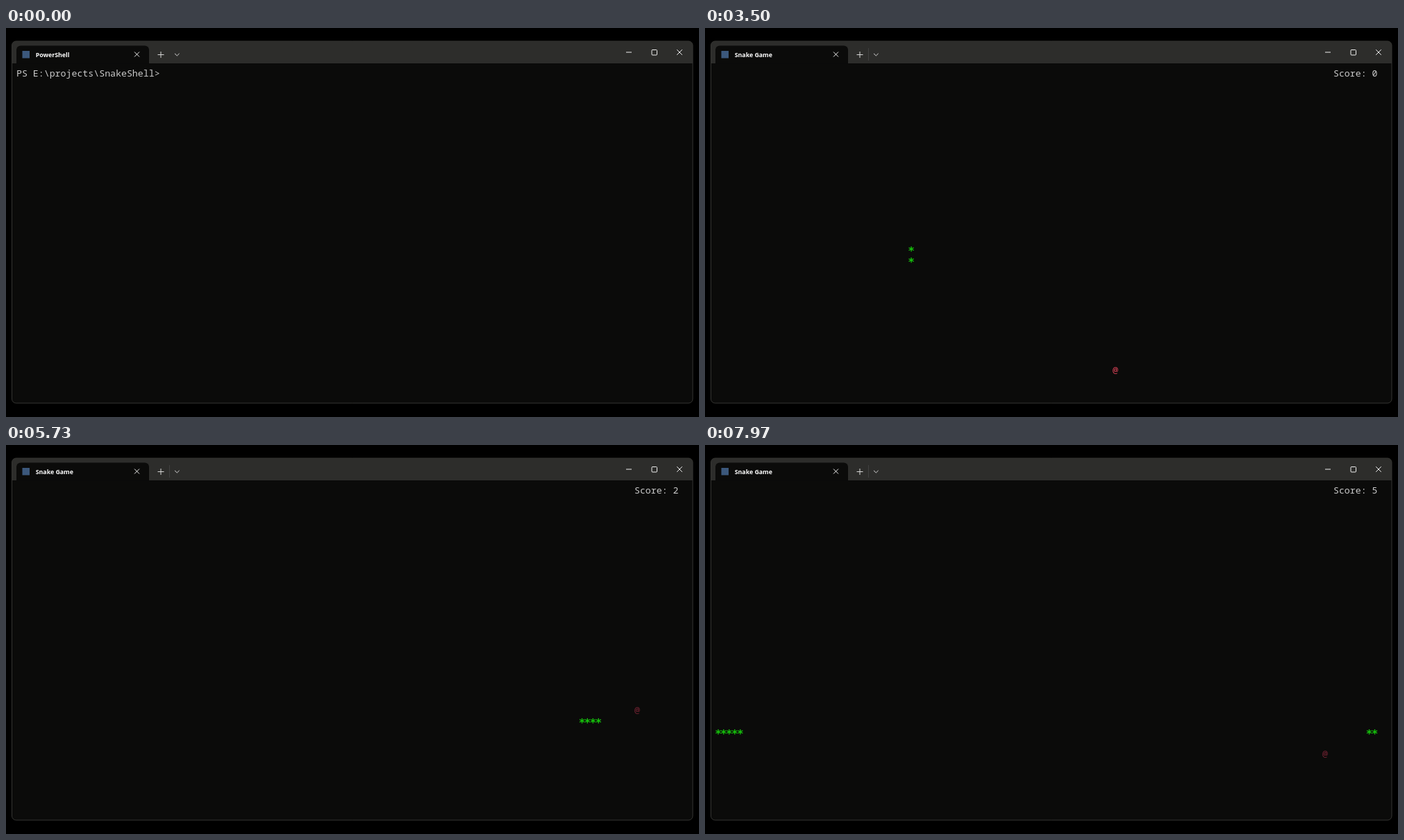
Recreate the animation shown at these times as an HTML page with a canvas. Size 998x561 px, loop 8 s.

```html
<!DOCTYPE html>
<html lang="en">
<head>
<meta charset="utf-8">
<title>Terminal snake</title>
<style>
  html, body { margin: 0; width: 100%; height: 100%; overflow: hidden; background: #000; }
  canvas { display: block; width: 998px; height: 561px; }
</style>
</head>
<body>
<canvas id="stage" width="998" height="561"></canvas>
<script>
const ctx = document.getElementById('stage').getContext('2d');
const LOOP = 8000, COLS = 120, CELL_W = 7.946, CELL_H = 15.86, LEFT = 15, TOP = 57;
const MONO = '13.24px "Noto Sans Mono", monospace';
const STAR = 'bold 16px "DejaVu Sans Mono", monospace';
const COLOR = {
  back: '#0b0b0a', bar: '#2d2d2b', edge: '#353532', text: '#cccccc', command: '#f3eca4',
  hint: '#6e6e6c', green: '#16c60c', food: '#e0455a', faint: '#782434'
};
const PROMPT = 'PS E:\\projects\\SnakeShell> ';
const GAME_START = 2700;

// Typed text and completion hint from each time on.
const typing = [
  [0, '', ''], [1630, 'c', 'lear'], [1770, 'ca', 'rgo run'],
  [1870, 'car', 'go run'], [1970, 'cargo run', '']
];

// Head route: runs of steps per direction, starting at the top left cell.
const route = 'R35 D28 R37 U7 L24 D4 R32 U4 R32 U4 L52 D6 L31 U8 L7 D7 L40';
const DIRS = { R: [1, 0], L: [-1, 0], U: [0, -1], D: [0, 1] };
const path = [[0, 0]];
for (const run of route.split(' ')) {
  const [dx, dy] = DIRS[run[0]];
  for (let n = +run.slice(1); n > 0; n--) {
    const [x, y] = path[path.length - 1];
    path.push([(x + dx + COLS) % COLS, y + dy]);
  }
}
const foods = [[72, 27], [48, 25], [112, 20], [80, 17], [29, 18], [110, 24]];
const eatenAt = [];
for (const [fx, fy] of foods.slice(0, -1)) {
  const from = eatenAt.length ? eatenAt[eatenAt.length - 1] : 0;
  eatenAt.push(path.findIndex(([x, y], i) => i > from && x === fx && y === fy));
}
const pace = [[2700, 1], [2730, 2], [4100, 91], [5730, 196], [6730, 262], [7970, 342]];

function headStep(t) {
  let i = 0;
  while (i < pace.length - 2 && t >= pace[i + 1][0]) i++;
  const [t0, s0] = pace[i], [t1, s1] = pace[i + 1];
  return Math.round(s0 + (s1 - s0) * (t - t0) / (t1 - t0));
}

function write(text, col, row, color, style = '') {
  ctx.font = style + ' ' + MONO;
  ctx.fillStyle = color;
  [...text].forEach((ch, i) => ctx.fillText(ch, LEFT + (col + i) * CELL_W, TOP + row * CELL_H + 12.7));
}

function caret(col, row) {
  ctx.fillStyle = '#f2f2f2';
  ctx.fillRect(Math.round(LEFT + col * CELL_W - 0.6), TOP + row * CELL_H, 1, CELL_H);
}

function box(x, y, w, h, radius, fill, edge) {
  ctx.beginPath();
  ctx.roundRect(x, y, w, h, radius);
  if (fill) { ctx.fillStyle = fill; ctx.fill(); }
  if (edge) { ctx.strokeStyle = edge; ctx.stroke(); }
}

function line(color, ...points) {
  ctx.beginPath();
  points.forEach(([x, y]) => ctx.lineTo(x, y));
  ctx.strokeStyle = color;
  ctx.stroke();
}

function cross(x, y, r) {
  line('#f0f0f0', [x - r, y - r], [x + r, y + r]);
  line('#f0f0f0', [x - r, y + r], [x + r, y - r]);
}

function drawWindow(title, t) {
  ctx.fillStyle = '#000';
  ctx.fillRect(0, 0, 998, 561);
  ctx.lineWidth = 1;
  box(8.5, 19, 980.5, 522, 6, COLOR.back);
  box(8.5, 19, 980.5, 32, [6, 6, 0, 0], COLOR.bar);
  box(8.5, 19, 980.5, 522, 6, null, COLOR.edge);
  box(15, 25.5, 191, 26, [6, 6, 0, 0], COLOR.back);
  box(23.5, 33, 10.5, 10.5, 0, '#3c587c');
  ctx.font = 'bold 8.8px "Open Sans", "Noto Sans", sans-serif';
  ctx.fillStyle = '#fff';
  ctx.fillText(title, 42.7, 42);
  cross(188.5, 38, 3.5);
  line('#d8d8d8', [218.5, 38.5], [227.5, 38.5]);
  line('#d8d8d8', [223, 34], [223, 43]);
  if (t >= 30) line('#414140', [235.5, 29], [235.5, 47]);
  line('#d8d8d8', [243, 36.8], [246.3, 40], [249.6, 36.8]);
  line('#f0f0f0', [893, 35], [901, 35]);
  box(930, 31.5, 7.5, 7.5, 1, null, '#f0f0f0');
  cross(970, 35, 3.8);
}

function drawShell(t) {
  const [, typed, hint] = typing.filter(entry => t >= entry[0]).pop();
  const [command, ...args] = typed.split(' ');
  const end = PROMPT.length + typed.length;
  write(PROMPT, 0, 0, COLOR.text);
  write(command, PROMPT.length, 0, COLOR.command);
  if (args.length) write(args.join(' '), PROMPT.length + command.length + 1, 0, COLOR.text);
  write(hint, end, 0, COLOR.hint, 'italic');
  if (t >= 2170) {
    write('    Finished', 0, 1, COLOR.green, 'bold');
    write('dev [unoptimized + debuginfo] target(s) in 0.03s', 13, 1, COLOR.text);
  }
  if (t >= 2230) {
    write('     Running', 0, 2, COLOR.green, 'bold');
    write('`target\\debug\\snake_shell.exe`', 13, 2, COLOR.text);
  }
  if (t >= 2300) caret(0, 3);
  else if (t >= 1630 && t < 2070) caret(end, 0);
  else if (t < 1630 && (t + 860) % 1060 < 530 && t >= 200) caret(end, 0);
}

function drawGame(t) {
  const head = headStep(t);
  const score = eatenAt.filter(step => head >= step).length;
  write('Score: ' + score, 112, 0, COLOR.text);
  const lit = t % 800 >= 200 && t % 800 < 600;
  write('@', ...foods[score], lit ? COLOR.food : COLOR.faint);
  ctx.font = STAR;
  ctx.fillStyle = COLOR.green;
  ctx.textAlign = 'center';
  for (const [x, y] of path.slice(Math.max(0, head - score - 1), head + 1)) {
    ctx.fillText('*', LEFT + (x + 0.5) * CELL_W, TOP + y * CELL_H + 16.2);
  }
  ctx.textAlign = 'left';
}

function draw(now) {
  const step = Math.floor((now % LOOP + 3.4) * 3 / 100) % 240;
  const t = Math.round(step * 10 / 3) * 10;
  const playing = t >= GAME_START;
  drawWindow(playing ? 'Snake Game' : 'PowerShell', t);
  (playing ? drawGame : drawShell)(t);
}

const start = performance.now();
function tick() {
  draw(performance.now() - start);
  requestAnimationFrame(tick);
}
tick();
</script>
</body>
</html>
```
